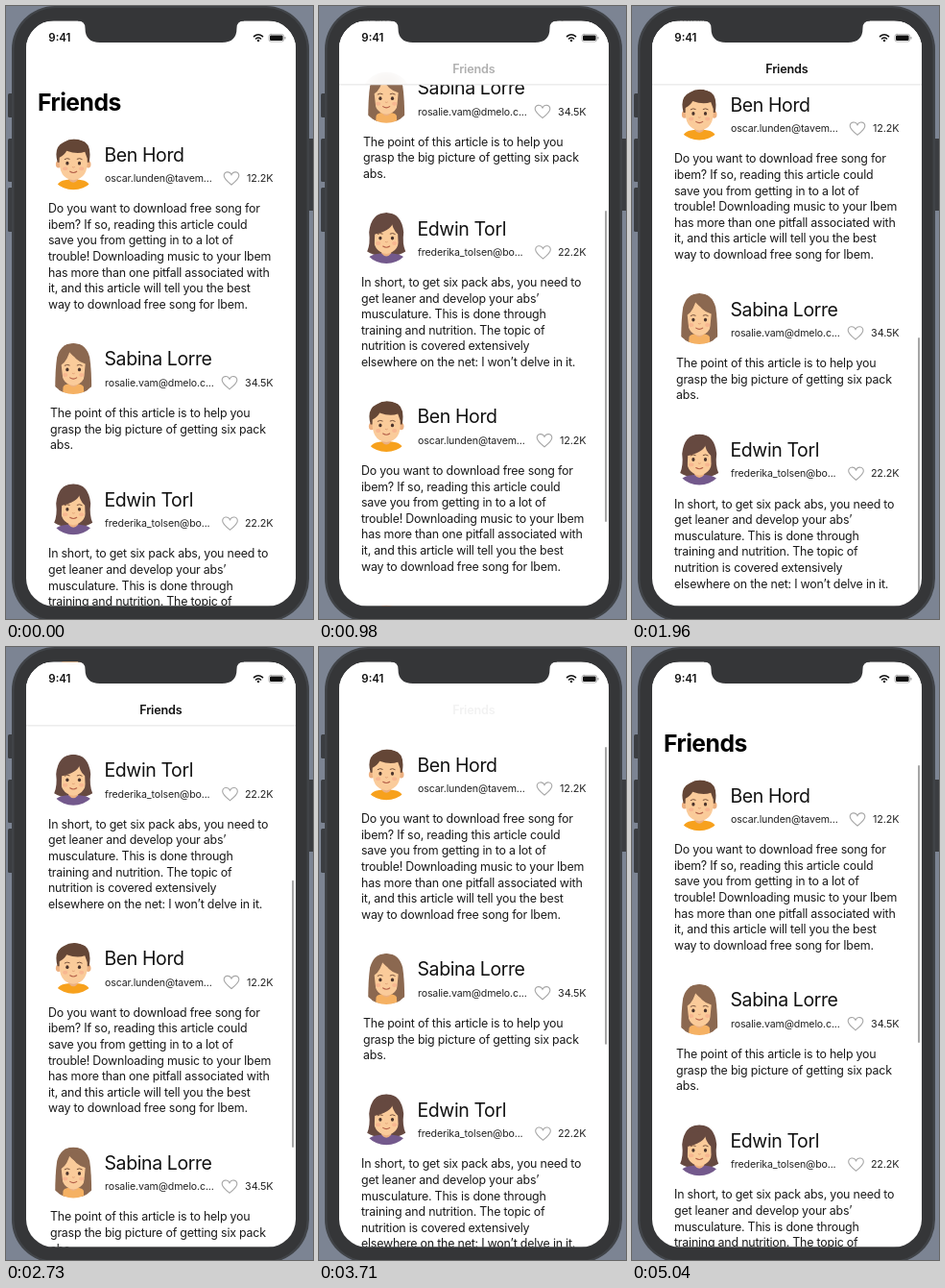
Write an HTML page with a canvas that moves like this. It is 320 px wide and 638 px high and loops after 5.11 s.

```html
<!DOCTYPE html>
<html lang="en">
<head>
<meta charset="utf-8">
<title>Friends list</title>
<style>
  html, body { margin: 0; width: 100%; height: 100%; overflow: hidden; background: #7c8493; }
  canvas { display: block; width: 320px; height: 638px; }
</style>
</head>
<body>
<canvas id="stage"></canvas>
<script>
const LOOP = 5110, W = 320, H = 638, PERIOD = 555;
const NAV_BOTTOM = 82, COLLAPSE = 41;
const SCREEN = { x: 21, y: 15.4, w: 281, h: 609.2 };
const BEZEL = '#353638';
const canvas = document.getElementById('stage');
const ctx = canvas.getContext('2d');
const ratio = Math.max(1, window.devicePixelRatio || 1);
canvas.width = W * ratio;
canvas.height = H * ratio;

const people = [
  { name: 'Ben Hord', mail: 'oscar.lunden@tavem...', likes: '12.2K', top: 154.7, textX: 44, heartX: 235,
    hair: '#644636', shirt: '#f7a11d', draw: drawShortHair,
    lines: ['Do you want to download free song for', 'ibem? If so, reading this article could',
      'save you from getting in to a lot of', 'trouble! Downloading music to your Ibem',
      'has more than one pitfall associated with', 'it, and this article will tell you the best',
      'way to download free song for Ibem.'] },
  { name: 'Sabina Lorre', mail: 'rosalie.vam@dmelo.c...', likes: '34.5K', top: 367.4, textX: 46, heartX: 233,
    hair: '#8b6850', shirt: '#f5b163', draw: drawLongHair,
    lines: ['The point of this article is to help you', 'grasp the big picture of getting six pack', 'abs.'] },
  { name: 'Edwin Torl', mail: 'frederika_tolsen@bo...', likes: '22.2K', top: 513.8, textX: 44, heartX: 233.5,
    hair: '#664940', shirt: '#73598c', draw: drawBob,
    lines: ['In short, to get six pack abs, you need to', 'get leaner and develop your abs’',
      'musculature. This is done through', 'training and nutrition. The topic of',
      'nutrition is covered extensively', 'elsewhere on the net: I won’t delve in it.'] }
];

const clamp01 = v => Math.min(1, Math.max(0, v));
const mix = (a, b, u) => a + (b - a) * u;
const ramp = (t, from, to) => clamp01((t - from) / (to - from));

// Flick scrolling: a short drag, then exponential slow-down, then a soft bounce at the top.
const DECAY = 500;
const glide = (t, start) => 1 - Math.exp(-(t - start) / DECAY);
const flickDown = t => 660 * glide(t, 702);
const flickUp = t => 643 - 669 * glide(t, 2488);
const TOP_REACHED = 2488 + DECAY * Math.log(669 / 26);

function scrollAt(t) {
  if (t < 590) return 0;
  if (t < 810) return flickDown(810) * ramp(t, 590, 810) ** 2;
  if (t < 2380) return flickDown(t);
  if (t < 2600) return mix(flickDown(2380), flickUp(2600), ramp(t, 2380, 2600) ** 2);
  if (t < TOP_REACHED) return flickUp(t);
  const since = t - TOP_REACHED;
  return -26 / DECAY * since * Math.exp(-since / 70);
}

// scroll offset, indicator top, indicator bottom
const indicatorStops = [[0, 123, 412], [52, 92, 415], [108, 121, 444], [282, 213, 537],
  [386, 243, 521], [607, 345, 612], [650, 365, 621]];

function indicatorAt(y) {
  if (y <= 0) return [123 - 1.5 * y, 412 + y];
  const i = Math.max(1, indicatorStops.findIndex(stop => stop[0] >= y));
  const a = indicatorStops[i - 1], b = indicatorStops[i];
  const u = ramp(y, a[0], b[0]);
  return [mix(a[1], b[1], u), mix(a[2], b[2], u)];
}

function text(str, x, y, size, { weight = 400, color = '#111', spacing = 0, align = 'left' } = {}) {
  ctx.font = `${weight} ${size}px Inter, "Liberation Sans", sans-serif`;
  ctx.letterSpacing = spacing + 'px';
  ctx.textAlign = align;
  ctx.fillStyle = color;
  ctx.fillText(str, x, y);
}

function box(x, y, w, h, r, color) {
  ctx.beginPath();
  ctx.roundRect(x, y, w, h, r);
  ctx.fillStyle = color;
  ctx.fill();
}

function oval(x, y, rx, ry, color) {
  ctx.beginPath();
  ctx.ellipse(x, y, rx, ry, 0, 0, Math.PI * 2);
  ctx.fillStyle = color;
  ctx.fill();
}

function shape(path, color) {
  ctx.fillStyle = color;
  ctx.fill(new Path2D(path));
}

function line(path, color, width) {
  ctx.strokeStyle = color;
  ctx.lineWidth = width;
  ctx.lineCap = 'round';
  ctx.stroke(new Path2D(path));
}

const SKIN = '#facb9a', SHADE = '#ecb081';

function drawFeatures(y) {
  for (const side of [-1, 1]) {
    oval(side * 6.3, y, 1.6, 1.9, '#4a332b');
    oval(side * 8.5, y + 5.5, 2.6, 2, '#f8b791');
    line(`M${side * 4} ${y - 4.5} Q${side * 6.5} ${y - 6} ${side * 9} ${y - 4.2}`, '#7a543d', 1);
  }
  line(`M-1 ${y + 4} Q0 ${y + 5} 1.2 ${y + 4}`, '#e0a077', 0.9);
  line(`M-3.5 ${y + 8.5} Q0 ${y + 11} 3.5 ${y + 8.5}`, '#b5614a', 1.1);
}

function drawBust(shirt, halfWidth) {
  shape(`M${-halfWidth} 27 Q${-halfWidth} 17 -6 16 L6 16 Q${halfWidth} 17 ${halfWidth} 27 Z`, shirt);
  shape('M-5 10 L5 10 L5 16 Q0 22 -5 16 Z', SHADE);
}

function drawShortHair({ hair, shirt }) {
  drawBust(shirt, 18);
  for (const side of [-1, 1]) oval(side * 15.5, 0, 2.8, 3.8, SHADE);
  shape('M-16.5 -2 Q-21 -18 -10 -23 Q-2 -28 8 -25 Q20 -22 16.5 -2 Z', hair);
  shape('M-14.5 -7 Q-9 -10 -7 -14 Q4 -10 12 -13 L14.5 -6 Q16 15 0 16.5 Q-16 15 -14.5 -7 Z', SKIN);
  drawFeatures(-1);
}

function drawLongHair({ hair, shirt }) {
  shape('M-19 25 Q-19 0 -17 -12 Q-13 -26.5 0 -26.5 Q13 -26.5 17 -12 Q19 0 19 25 Z', hair);
  drawBust(shirt, 13);
  shape('M-13 -8 Q-8 -10 -5 -18 Q3 -9 13 -7 Q15 16 0 17.5 Q-15 16 -13 -8 Z', SKIN);
  shape('M-15 25 L-15 -6 Q-14 -20 -3 -21 Q-6 -8 -12.5 -4 L-10.5 15 L-11 25 Z', hair);
  shape('M15 25 L15 -6 Q13 -20 -4 -21 Q1 -8 12.5 -5 L10.5 15 L11 25 Z', hair);
  drawFeatures(1);
}

function drawBob({ hair, shirt }) {
  shape('M-20 14 Q-16.5 6 -18 -6 Q-16 -26 0 -26.5 Q16 -26 18 -6 Q16.5 6 20 14 Q13 19 0 18 Q-13 19 -20 14 Z', hair);
  drawBust(shirt, 21);
  shape('M-13 -4 Q4 -7 7 -16 Q8 -8 13 -4 Q15 14 0 16.5 Q-15 14 -13 -4 Z', SKIN);
  shape('M-15 -4 Q-15 -20 5 -20 Q4 -8 -12 -4 L-12.5 9 Z M15 -4 Q15 -18 5 -20 Q6 -9 12 -4 L12.5 9 Z', hair);
  drawFeatures(0);
}

function drawAvatar(person, y) {
  ctx.save();
  ctx.translate(70.2, y + 10);
  ctx.beginPath();
  ctx.arc(0, 0, 26.5, 0, Math.PI * 2);
  ctx.clip();
  person.draw(person);
  ctx.restore();
}

function drawHeart(x, y) {
  ctx.save();
  ctx.translate(x, y);
  line('M0 6.7 C-4 3.5 -7.8 0.5 -7.8 -2.6 C-7.8 -7.2 -2 -8 0 -3.8 C2 -8 7.8 -7.2 7.8 -2.6 C7.8 0.5 4 3.5 0 6.7 Z',
    '#a6a6a6', 1.1);
  ctx.restore();
}

function drawRow(person, y) {
  drawAvatar(person, y);
  text(person.name, 102.5, y + 7, 19.5, { spacing: -0.4 });
  text(person.mail, 103, y + 28.4, 10.6, { spacing: -0.13, color: '#222' });
  drawHeart(person.heartX, y + 24.7);
  text(person.likes, 278.5, y + 28.4, 10.8, { spacing: -0.1, color: '#222', align: 'right' });
  person.lines.forEach((str, i) =>
    text(str, person.textX, y + 60.5 + i * 16.6, 12.4, { spacing: -0.2, color: '#1a1a1a' }));
}

function eachRow(scroll, visit) {
  for (let cycle = 0; cycle < 3; cycle++) {
    for (const person of people) {
      const y = person.top + cycle * PERIOD - scroll;
      if (y > -130 && y < 660) visit(person, y);
    }
  }
}

function drawNavBar(t, scroll) {
  const { x, y, w } = SCREEN, h = NAV_BOTTOM - y;
  const cover = color => {
    ctx.fillStyle = color;
    ctx.fillRect(x, y, w, h);
  };
  ctx.save();
  ctx.beginPath();
  ctx.rect(x, y, w, h);
  ctx.clip();
  cover('#fff');
  if (scroll > COLLAPSE) {
    ctx.filter = 'blur(7px)';
    eachRow(scroll, (person, rowY) => { if (rowY < 100) drawAvatar(person, rowY); });
    ctx.filter = 'none';
    cover('rgba(255,255,255,.93)');
  }
  ctx.restore();
  if (scroll > COLLAPSE) {
    ctx.fillStyle = '#dcdcdc';
    ctx.fillRect(x, NAV_BOTTOM - 0.5, w, 0.8);
  }
  ctx.globalAlpha = ramp(t, 900, 1140) * (1 - ramp(t, 3550, 3720));
  text('Friends', 161.4, 69.8, 12.6, { weight: 600, spacing: -0.15, align: 'center' });
  ctx.globalAlpha = 1;
}

function drawStatusBar() {
  text('9:41', 44.3, 37.2, 11.5, { weight: 600 });
  line('M258.5 31.7 Q263 27.8 267.5 31.7', '#111', 1.6);
  line('M260.5 34 Q263 32 265.5 34', '#111', 1.6);
  oval(263, 36, 1.2, 1.2, '#111');
  ctx.beginPath();
  ctx.roundRect(273.9, 29.4, 15.8, 7.6, 2.2);
  ctx.lineWidth = 0.7;
  ctx.strokeStyle = '#999';
  ctx.stroke();
  box(275, 30.5, 13.6, 5.4, 1.2, '#111');
  box(290.4, 32, 1, 2.5, 0.5, '#888');
}

function drawPhone() {
  ctx.fillStyle = '#7c8493';
  ctx.fillRect(0, 0, W, H);
  for (const [x, y, h] of [[2, 91, 25], [2, 138, 45], [2, 189, 46], [313, 138, 75]]) {
    box(x, y, 8, h, 1.5, '#3b3d41');
  }
  box(6, 0, 310, 641, 45, '#404347');
  box(8.5, 2, 305, 637, 43, BEZEL);
}

function drawNotch() {
  shape('M75 15 L75 15.4 Q82.5 15.4 82.5 23 Q82.5 38 98 38 L225 38 Q240.5 38 240.5 23 Q240.5 15.4 248 15.4 L248 15 Z',
    BEZEL);
}

function render(t) {
  const scroll = scrollAt(t);
  const { x, y, w, h } = SCREEN;
  ctx.setTransform(ratio, 0, 0, ratio, 0, 0);
  drawPhone();
  ctx.save();
  ctx.beginPath();
  ctx.roundRect(x, y, w, h, 29);
  ctx.clip();
  ctx.fillStyle = '#fff';
  ctx.fillRect(x, y, w, h);
  eachRow(scroll, drawRow);
  text('Friends', 33, 109.3 - scroll, 24.7, { weight: 700, spacing: -0.5, color: '#000' });
  drawNavBar(t, scroll);
  drawStatusBar();
  if (t > 590) {
    const [top, bottom] = indicatorAt(scroll);
    box(298, top, 2, bottom - top, 1, 'rgba(0,0,0,.35)');
  }
  ctx.restore();
  drawNotch();
}

function tick() {
  render(performance.now() % LOOP);
  requestAnimationFrame(tick);
}
tick();
</script>
</body>
</html>
```
